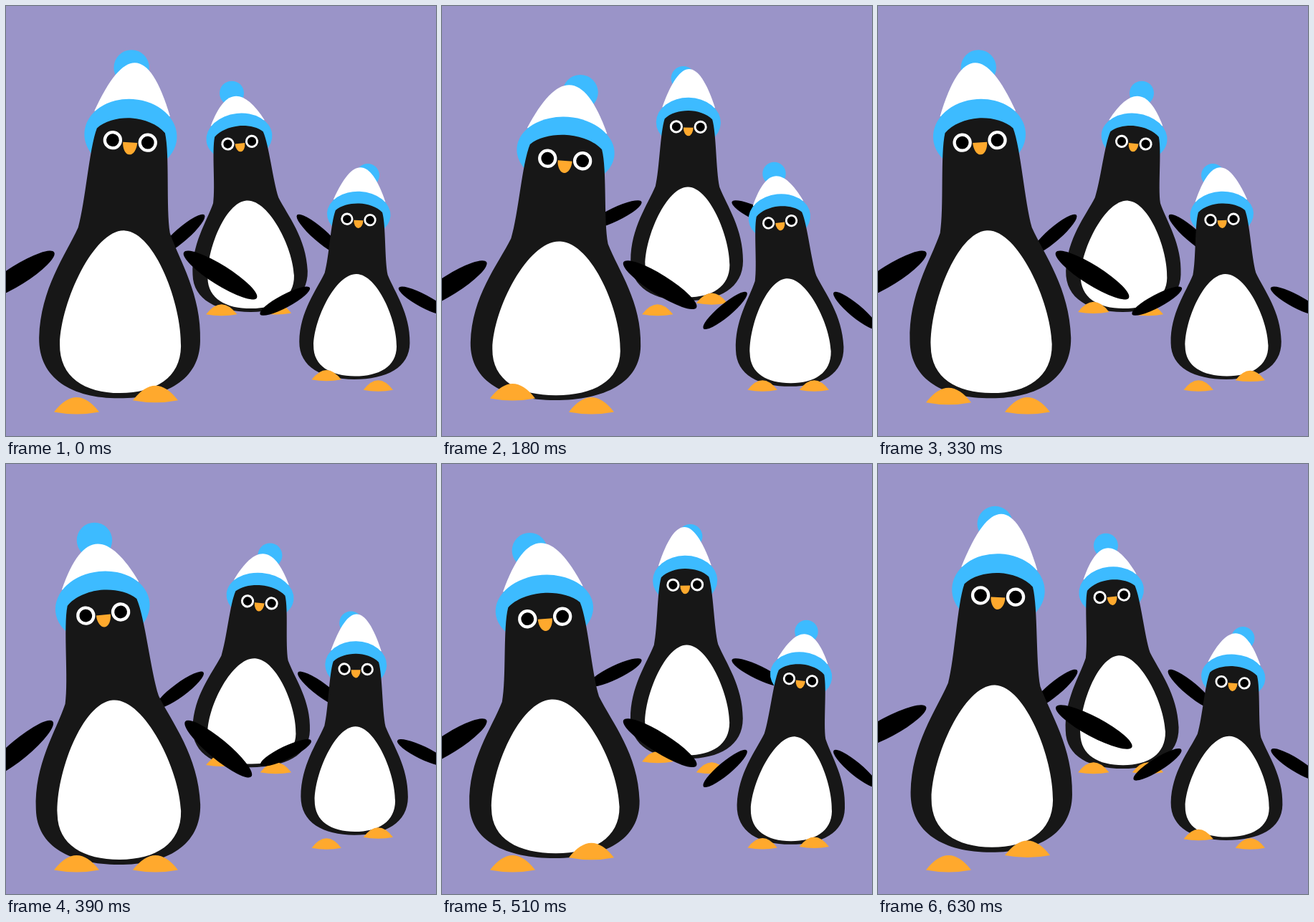
Write an HTML page with a canvas that moves like this. It is 600 px wide and 600 px high and loops after 660 ms.

```html
<!DOCTYPE html>
<html lang="en">
<head>
<meta charset="utf-8">
<title>Marching penguins</title>
<style>
  html, body { margin: 0; width: 100%; height: 100%; overflow: hidden; background: #9a94c8; }
  canvas { display: block; width: 600px; height: 600px; }
</style>
</head>
<body>
<canvas id="stage" width="600" height="600"></canvas>
<script>
const ctx = document.getElementById('stage').getContext('2d');
const LOOP = 660, HOP = LOOP / 2, STEP = 30, TAU = Math.PI * 2;
const COLOR = {
  sky: '#9a94c8', body: '#171717', black: '#000', white: '#fff',
  hat: '#3dbbff', orange: '#ffa92d'
};

// Penguins from back to front: ground point, size and time offset.
const PENGUINS = [
  { x: 341.5, y: 432.3, size: 0.688, delay: 420 },
  { x: 157.7, y: 569.5, size: 1, delay: 0 },
  { x: 486, y: 537.7, size: 0.656, delay: 210 }
];

// Outlines are left halves made of cubic control points: [x, height].
const bowl = (width, low, mid) => [
  [0, low], [-0.58 * width, low], [-width, mid - 0.68 * (mid - low)], [-width, mid]];
const dome = (width, mid, high) => [
  [-width, mid + 0.37 * (high - mid)], [-width / 2, high], [0, high]];

const BELLY = [...bowl(87, 7, 72), ...dome(87, 72, 227.5)];
const BODY = [...bowl(115.7, 0, 80),
  [-115.7, 145], [-82, 190], [-66, 228],  // flank
  [-58, 262], [-58, 335], [-49, 363],     // neck
  [-38, 374.5], [-17, 380], [0, 380]];    // crown

const mirror = half =>
  half.concat(half.slice(0, -1).reverse().map(([x, h]) => [-x, h]));

function fillCurve(points, color) {
  ctx.beginPath();
  ctx.moveTo(...points[0]);
  for (let i = 1; i + 2 < points.length; i += 3) {
    ctx.bezierCurveTo(...points[i], ...points[i + 1], ...points[i + 2]);
  }
  ctx.fillStyle = color;
  ctx.fill();
}

function fillEllipse(x, y, rx, ry, angle, color, sweep = TAU) {
  ctx.beginPath();
  ctx.ellipse(x, y, rx, ry, angle, 0, sweep);
  ctx.fillStyle = color;
  ctx.fill();
}

// A step starts at the given time and rises a little slower than it falls.
function footLift(t, start) {
  const u = (t - start + LOOP) % LOOP / HOP;
  return u < 1 ? 23 * Math.sin(Math.PI * u ** 1.2) : 0;
}

function drawFoot(x, lift) {
  const y = -3 - lift;
  ctx.beginPath();
  ctx.moveTo(x - 31.5, y);
  ctx.quadraticCurveTo(x, y - 41, x + 31.5, y);
  ctx.quadraticCurveTo(x, y + 6, x - 31.5, y);
  ctx.fillStyle = COLOR.orange;
  ctx.fill();
}

function drawFace(x, y, angle) {
  ctx.save();
  ctx.translate(x, y);
  ctx.rotate(angle);
  for (const side of [-24.5, 24.5]) {
    fillEllipse(side, 0, 13.2, 13.2, 0, COLOR.white);
    fillEllipse(side, 0, 8.9, 8.9, 0, COLOR.black);
  }
  fillEllipse(0, 1.5, 10, 17, 0, COLOR.orange, Math.PI);
  ctx.restore();
}

function drawPenguin({ x, y, size, delay }, now) {
  const t = (now + delay) % LOOP;
  const hop = TAU * t / HOP;
  const sway = lag => Math.cos(TAU * (t - lag) / LOOP);
  const stretch = Math.cos(hop + 0.13);
  const sx = 1 - 0.0285 * stretch, sy = 1 + 0.0287 * stretch;
  const base = -19.2 - 3 * Math.cos(hop) + 11 * Math.sin(hop);

  // The spine bends up to the neck and goes on straight above it.
  const bend = 1.95e-4 * sway(90);
  const bentPart = h => Math.min(h * sy, 280);
  const tilt = h => 2 * bend * bentPart(h);
  const place = ([px, h]) => {
    const height = h * sy, bent = bentPart(h), angle = tilt(h);
    return [bend * bent * (2 * height - bent) + px * sx * Math.cos(angle),
      base - height + px * sx * Math.sin(angle)];
  };

  ctx.save();
  ctx.translate(x, y);
  ctx.scale(size, size);

  // Hat
  const peak = 406.5 + (45.4 + 4.6 * Math.cos(hop) - 10.8 * Math.sin(hop)) / sy;
  const [peakX, peakY] = place([0, peak]);
  fillEllipse(peakX + 14.5 * sway(210), peakY + 6.7 - 13.1 * Math.sin(hop),
    24.7, 24.7, 0, COLOR.hat);
  const brim = 386, crest = brim + (peak - brim) * 4 / 3;
  fillCurve([[-54.5, brim], [-18, crest], [18, crest], [54.5, brim]].map(place), COLOR.white);
  fillEllipse(...place([0, 356.5]), 66.5 * sx, 49.5 * sy, tilt(356.5), COLOR.hat);

  // Body
  fillCurve(mirror(BODY).map(place), COLOR.body);
  fillCurve(mirror(BELLY).map(([px, h]) => place([px + 1.2, h])), COLOR.white);
  drawFace(...place([0, 346.5 + 2 * stretch]), tilt(346.5));

  // Flippers
  const swing = (33.2 + 7.8 * Math.cos(hop - TAU * 90 / HOP)) * Math.PI / 180;
  for (const side of [-1, 1]) {
    fillEllipse(side * (94 * sx + 59 * Math.cos(swing)),
      base - 197.5 * sy + 59 * Math.sin(swing), 60, 13.8, side * swing, COLOR.black);
  }

  drawFoot(-59.2, footLift(t, 55));
  drawFoot(50.8, footLift(t, 400));
  ctx.restore();
}

let start;
function render(time) {
  start ??= time;
  const now = Math.floor((time - start) % LOOP / STEP) * STEP;
  ctx.fillStyle = COLOR.sky;
  ctx.fillRect(0, 0, 600, 600);
  PENGUINS.forEach(penguin => drawPenguin(penguin, now));
  requestAnimationFrame(render);
}
requestAnimationFrame(render);
</script>
</body>
</html>
```
